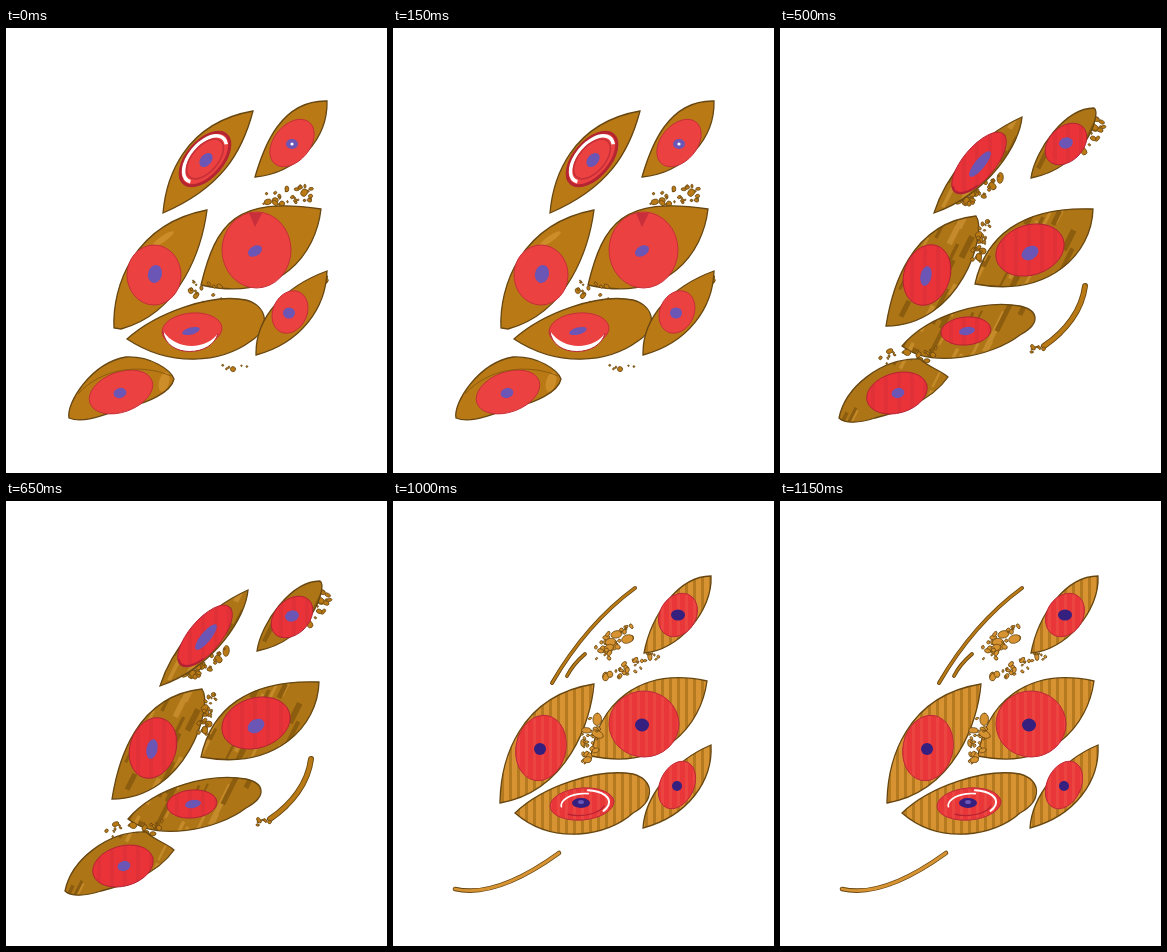
An HTML page with a canvas that plays this animation: 381x445 px, repeating every 1.25 s.

```html
<!DOCTYPE html>
<html lang="en">
<head>
<meta charset="utf-8">
<title>Blinking eyes</title>
<style>
html, body { margin: 0; width: 100%; height: 100%; overflow: hidden; background: #fff; }
canvas { display: block; }
</style>
</head>
<body>
<canvas id="stage" width="381" height="445"></canvas>
<script>
const ctx = document.getElementById('stage').getContext('2d');
const HOLD = 250;
const LIGHT = '#d79331', DARK = '#b97915', BROWN = '#8c5d0e', EDGE = '#664611';
const VIOLET = '#6b55b5', INDIGO = '#352080', MAUVE = '#9161ad';

// Paint settings of the current pose
let look;

function random(seed) {
  let s = seed * 7919 + 17;
  return () => (s = (s * 16807) % 2147483647) / 2147483647;
}

function oval([x, y, rx, ry = rx, deg = 0], scale = 1, from = 0, to = 360) {
  const rad = Math.PI / 180;
  ctx.beginPath();
  ctx.ellipse(x, y, rx * scale, ry * scale, deg * rad, from * rad, to * rad);
}

function fillOval(shape, color) {
  oval(shape);
  ctx.fillStyle = color;
  ctx.fill();
}

function arc(shape, scale, from, to, color, width) {
  oval(shape, scale, from, to);
  ctx.strokeStyle = color;
  ctx.lineWidth = width;
  ctx.stroke();
}

function line(d, color, width) {
  ctx.strokeStyle = color;
  ctx.lineWidth = width;
  ctx.stroke(new Path2D(d));
}

function ribbon(d, width, color = DARK) {
  line(d, EDGE, width);
  line(d, color, width - 1.8);
}

function lid(d, patch) {
  const path = new Path2D(d + 'Z');
  ctx.save();
  ctx.clip(path);
  ctx.fillStyle = look.lid;
  ctx.fillRect(0, 0, 381, 445);
  if (look.texture) look.texture();
  if (patch) fillOval(patch, look.patch);
  ctx.restore();
  ctx.strokeStyle = EDGE;
  ctx.lineWidth = 1.3;
  ctx.stroke(path);
}

function iris(shape) {
  fillOval(shape, look.iris);
  if (look.grain) {
    ctx.save();
    oval(shape);
    ctx.clip();
    look.grain();
    ctx.restore();
  }
  arc(shape, 1, 0, 360, look.rim, 1);
  if (look.scribble) scribble(shape);
}

function eye(d, ring, pupil, color = look.pupil, patch) {
  lid(d, patch);
  iris(ring);
  fillOval(pupil, color);
}

function scribble(shape) {
  const rnd = random(shape[0]);
  for (let k = 0.36; k < 0.95; k += 0.13) {
    const start = rnd() * 360;
    arc(shape, k, start, start + 110 + rnd() * 130, '#d9792b', 1.2);
  }
}

// Droplets scattered around the segment (x1, y1)-(x2, y2)
function drops(seed, count, x1, y1, x2, y2, spread, size) {
  const rnd = random(seed);
  for (let i = 0; i < count; i++) {
    const t = rnd();
    const x = x1 + (x2 - x1) * t + (rnd() - 0.5) * spread;
    const y = y1 + (y2 - y1) * t + (rnd() - 0.5) * spread;
    const r = 0.7 + rnd() * rnd() * size;
    const blob = [x, y, r * (1 + rnd() * 0.8), r, rnd() * 180 - 90];
    fillOval(blob, look.drop);
    arc(blob, 1, 0, 360, EDGE, 0.8);
  }
}

function streaks() {
  const rnd = random(5);
  ctx.lineCap = 'butt';
  for (let i = 0; i < 230; i++) {
    const x = 55 + rnd() * 270, y = 75 + rnd() * 320, h = 10 + rnd() * 22;
    line(`M${x} ${y}l${-h * 0.5} ${h}`, rnd() < 0.58 ? BROWN : '#c58a2a', 2 + rnd() * 4);
  }
}

function dots(color, step, r) {
  ctx.fillStyle = color;
  ctx.beginPath();
  for (let row = 0, y = 70; y < 400; y += step, row++) {
    for (let x = 50 + (row % 2) * step; x < 335; x += step * 2) {
      ctx.moveTo(x + r, y);
      ctx.arc(x, y, r, 0, 7);
    }
  }
  ctx.fill();
}

function stripes(color, step, width) {
  ctx.fillStyle = color;
  for (let x = 52; x < 330; x += step) ctx.fillRect(x, 60, width, 350);
}

function plain() {
  look = { lid: DARK, patch: '#cd8d28', iris: '#eb4141', rim: '#c52f38', pupil: VIOLET, drop: '#b97915' };

  const ring = [199, 131, 33, 18, -49];
  lid('M157 185C160 150 178 95 247 83C236 125 215 160 157 185');
  iris(ring);
  arc(ring, 0.97, 0, 360, '#b52431', 3);
  arc(ring, 0.84, 165, 385, '#fff', 3.5);
  arc(ring, 0.72, 0, 360, '#c52f38', 1.5);
  fillOval([200, 132, 8, 5.5, -50], VIOLET);

  eye('M249 149C258 118 275 72 321 73C322 110 292 145 249 149', [286, 115, 27, 18, -50], [286, 116, 6, 5]);
  fillOval([286, 116, 1.6], '#fff');
  eye('M108 300C106 258 128 196 201 182C196 220 175 285 115 301', [148, 247, 27, 30], [149, 246, 7, 9, 15], VIOLET, [157, 211, 13, 3, -35]);

  drops(3, 30, 252, 173, 312, 164, 17, 3.8);
  eye('M195 257C210 195 230 168 315 181C310 225 275 275 195 257', [250.5, 222, 34.5, 38], [249, 223, 7.5, 5, -30]);
  ctx.fillStyle = '#c82f3b';
  ctx.fill(new Path2D('M243 185L256 185L249 199Z'));

  drops(8, 18, 178, 259, 220, 270, 22, 2.2);
  const low = [186, 302, 30, 17, -5];
  eye('M121 311C150 285 205 265 240 272C262 278 265 300 245 313C215 335 165 340 121 311', low, [185, 303, 9, 3.5, -15]);
  ctx.fillStyle = '#fff';
  ctx.fill(new Path2D('M157 303C160 331 207 329 212 305C202 321 171 324 157 303'));
  line('M157 303C160 331 207 329 212 305', '#b52431', 1);

  drops(4, 8, 313, 250, 321, 254, 10, 2.4);
  eye('M250 325C250 288 280 258 321 243C320 280 295 315 250 327', [284, 284, 17, 22, 25], [283, 285, 6, 5.5]);
  drops(6, 6, 217, 338, 240, 338, 7, 2);
  eye('M63 390C60 375 85 335 120 329C145 328 165 342 168 351C165 365 140 375 125 378C105 383 80 397 63 390',
    [115, 364, 33, 20, -20], [114, 365, 6.5, 5, -15], VIOLET, [158, 354, 5, 10, 15]);
  line('M72 366C95 340 135 335 165 348', '#8c5d0e', 1);
}

function scribbled() {
  look = { lid: LIGHT, patch: DARK, iris: '#e94537', rim: '#d9562c', pupil: INDIGO, drop: LIGHT, scribble: true };

  drops(12, 30, 207, 158, 238, 126, 15, 4.2);
  eye('M154 186C158 150 180 95 245 82C247 115 210 165 154 186', [196, 132, 35, 20, -52], [197, 132, 8.5, 7.5, -20], INDIGO, [238, 103, 29, 13, -60]);
  eye('M249 150C252 125 285 78 312 79C325 82 318 105 300 125C285 145 265 153 249 150', [285, 117, 23, 15, -50], [286, 117, 8, 6, -20], MAUVE, [309, 88, 16, 9, -45]);
  eye('M108 297C104 265 125 200 202 188C198 230 165 295 108 297', [149, 246, 28, 34, 18], [149, 247, 8, 9, 25], INDIGO, [190, 212, 30, 16, -60]);
  eye('M196 256C205 200 245 155 318 181C305 225 270 270 196 256', [250, 222, 35, 32, -10], [249, 225, 9, 7.5, -15], MAUVE, [234, 257, 42, 9, -8]);
  line('M258 190C280 185 295 187 315 182', '#b97915', 1);
  drops(9, 24, 207, 269, 254, 271, 19, 2.7);
  eye('M119 312C150 285 205 272 240 280C258 286 257 300 235 314C205 335 160 338 119 312', [183, 303, 30, 19, -7], [184, 302, 8.5, 5.5], INDIGO, [143, 321, 28, 6, 14]);
  drops(11, 14, 216, 331, 254, 312, 14, 1.7);
  look.scribble = false;
  eye('M248 327C262 310 262 285 285 268C300 255 310 240 317 245C315 270 300 300 280 313C265 325 252 330 248 327', [284, 284, 16.5, 26, 22], [284, 285, 5, 10, 27]);
  eye('M59 389C55 375 85 340 115 331C140 327 165 338 168 350C162 365 135 375 110 383C90 390 70 395 59 389', [116, 364, 31, 20, -15], [115, 364, 6, 5], MAUVE, [132, 346, 46, 19, 0]);
}

function streaked() {
  look = { lid: '#ae7516', iris: '#e93338', rim: '#b32234', pupil: VIOLET, drop: '#b97915', texture: streaks,
    grain: () => { ctx.globalAlpha = 0.2; stripes('#bd2938', 13, 4); } };

  drops(21, 34, 177, 180, 226, 143, 14, 3);
  eye('M154 185C165 150 195 110 242 89C240 115 210 165 154 185', [199, 135, 38, 16, -50], [200, 136, 16, 5, -51]);
  arc([199, 135, 38, 16, -50], 0.97, 120, 200, '#b32234', 2);
  drops(22, 24, 294, 132, 321, 94, 13, 3.5);
  eye('M251 150C255 122 285 80 314 80C322 85 305 140 251 150', [286, 116, 24, 17, -45], [286, 115, 7, 5.5, -15]);
  eye('M106 298C112 260 130 195 196 188C208 205 180 298 106 298', [147, 247, 23, 31, 18], [146, 248, 5.5, 10, 12]);
  drops(23, 28, 208, 190, 196, 229, 11, 3.6);
  eye('M195 256C205 210 240 178 313 181C312 225 270 270 195 256', [250, 222, 35, 25, -18], [250, 225, 9, 6.5, -30]);
  eye('M122 318C150 285 205 272 240 278C258 282 262 295 240 307C210 330 150 340 122 318', [186, 303, 25, 14, -5], [187, 303, 8, 4, -10]);
  ctx.lineCap = 'round';
  ribbon('M305 258C302 282 286 303 264 318', 6);
  drops(24, 8, 249, 322, 264, 319, 5, 2.5);
  drops(25, 26, 99, 330, 153, 326, 14, 3.4);
  eye('M59 390C65 360 100 330 140 331C150 340 160 342 168 349C150 375 115 385 95 390C80 395 65 396 59 390', [117, 365, 31, 20, -16], [118, 365, 6.5, 5, -15]);
}

function dotted() {
  look = { lid: LIGHT, iris: '#ec433d', rim: '#c52f38', pupil: INDIGO, drop: LIGHT,
    texture: () => dots('#b37617', 4.6, 2.7), grain: () => dots('#e34d45', 4, 1.8) };

  ctx.lineCap = 'round';
  ribbon('M227 103C232 96 237 90 243 87', 7, LIGHT);
  lid('M161 184C168 153 198 113 235 94C218 121 192 157 161 184');
  ctx.fillStyle = look.iris;
  ctx.fill(new Path2D('M165 179C172 154 200 116 232 97C216 121 190 154 165 179'));
  drops(31, 28, 145, 186, 166, 170, 20, 3.7);
  const core = (x, y) => fillOval([x, y, 3.5, 3, -30], VIOLET);

  eye('M251 148C253 122 285 75 319 76C322 110 285 148 251 150', [287, 115, 25, 18, -48], [286, 116, 8, 6.5]);
  core(286, 117);
  const ring = [148, 247, 23, 34, 22];
  eye('M107 298C108 260 135 195 195 185C206 205 185 270 130 299', ring, [148, 247, 8, 7.5, -35]);
  arc(ring, 0.85, 20, 165, '#d98a32', 1.3);
  arc(ring, 0.9, 215, 330, '#d98a32', 1.3);
  core(149, 246);
  eye('M195 255C205 210 230 170 285 177C300 178 315 182 314 190C305 225 265 268 195 255', [251, 219, 36, 36], [249, 225, 9, 6, -20]);
  arc([251, 219, 36, 36], 1.08, 145, 245, '#c18125', 1.2);
  core(250, 225);
  drops(32, 32, 319, 183, 301, 228, 14, 3.8);
  drops(33, 42, 84, 343, 138, 303, 30, 2.7);
  eye('M129 305C160 285 200 270 235 275C258 280 258 300 245 307C215 335 160 332 129 316', [187, 304, 32, 21, -10], [184, 302, 9, 4.5, -15]);
  core(184, 302);
  eye('M250 327C256 295 285 260 318 244C312 285 285 315 250 327', [284, 287, 15, 29, 25], [283, 284, 6, 8, 25]);
  core(283, 284);
  eye('M68 390C85 370 130 350 168 351C160 362 105 383 68 390', [116, 370, 33, 6, -22], [115, 370, 10, 3.5, -22]);
}

function striped() {
  look = { lid: LIGHT, iris: '#e93739', rim: '#bd2938', pupil: INDIGO, drop: LIGHT,
    texture: () => stripes('#b57a1f', 8, 3), grain: () => stripes('#ec4440', 8, 3) };

  ctx.lineCap = 'round';
  ribbon('M159 182C180 146 208 112 242 87', 4);
  ribbon('M174 175C178 167 185 159 192 153', 3.8);
  drops(41, 34, 206, 153, 238, 124, 17, 3.9);
  drops(42, 24, 211, 179, 246, 163, 15, 3.6);
  eye('M251 152C258 115 285 75 318 75C320 110 285 150 251 152', [285, 114, 18, 23, 32], [285, 114, 7, 5.5]);
  drops(43, 8, 249, 153, 264, 156, 6, 3);
  eye('M107 300C108 260 125 195 201 183C198 220 175 290 107 302', [148, 247, 25, 33, 12], [147, 248, 6, 6]);
  eye('M198 255C205 205 245 165 314 180C308 225 270 270 198 255', [251, 223, 35, 33], [249, 224, 7, 6.5]);
  drops(44, 36, 202, 220, 191, 258, 17, 3.8);
  const ring = [189, 303, 32, 16, -5];
  eye('M122 312C150 285 205 267 240 273C262 279 262 300 240 312C215 335 160 345 122 312', ring, [188, 302, 9, 5]);
  arc(ring, 0.85, 285, 400, '#fff', 2);
  arc(ring, 0.65, 175, 290, '#fff', 1.6);
  arc(ring, 0.72, 20, 130, '#b32234', 1.2);
  fillOval([188, 301, 3, 2], VIOLET);
  eye('M250 327C252 295 280 260 318 244C320 280 295 315 250 327', [284, 284, 17, 25, 25], [284, 285, 5, 5]);
  ribbon('M62 388C92 395 130 378 166 352', 4.6, LIGHT);
}

const poses = [plain, scribbled, streaked, dotted, striped];
let shown = -1;

function tick() {
  const index = Math.floor(performance.now() / HOLD) % poses.length;
  if (index !== shown) {
    shown = index;
    ctx.clearRect(0, 0, 381, 445);
    ctx.lineCap = 'butt';
    poses[index]();
  }
  requestAnimationFrame(tick);
}
tick();
</script>
</body>
</html>
```
